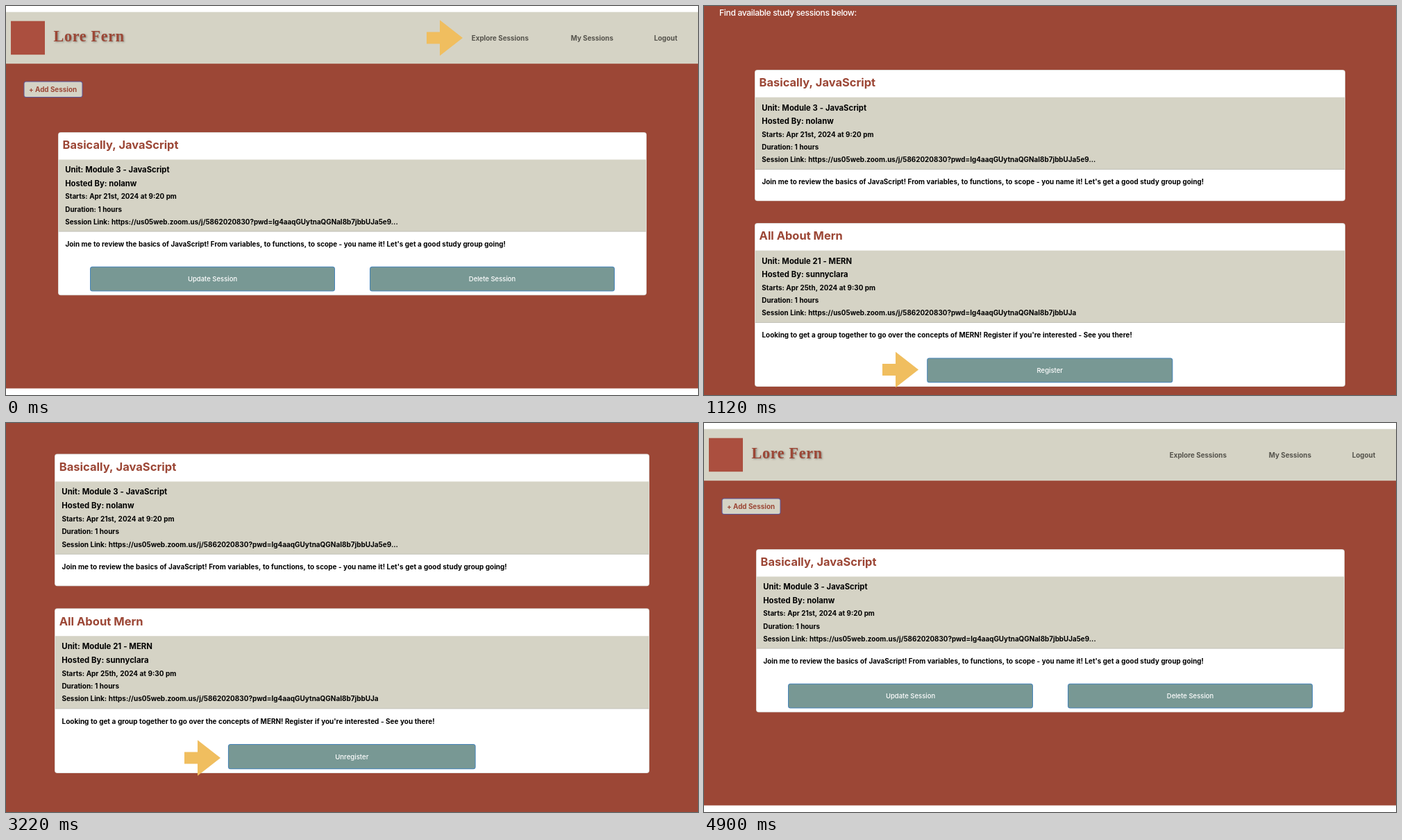
An HTML page with a canvas that plays this animation: 997 by 561 pixels, repeating every 5320 ms.

```html
<!DOCTYPE html>
<html lang="en">
<head>
<meta charset="utf-8">
<title>Study sessions</title>
<style>
html, body { margin: 0; width: 100%; height: 100%; overflow: hidden; background: #9c4736; }
canvas { display: block; width: 997px; height: 561px; }
</style>
</head>
<body>
<canvas id="stage"></canvas>
<script>
const W = 997, H = 561, LOOP = 5320;
const RED = '#9c4736', SAND = '#d5d3c5', TEAL = '#789894', GOLD = '#f0be5f';
const SANS = 'Inter, "Liberation Sans", sans-serif';
const SERIF = '"Liberation Serif", "Noto Serif", serif';
const STYLE = {
  title: { font: `700 16.4px ${SANS}`, color: RED },
  lead: { font: `700 11.25px ${SANS}`, color: '#000', space: '0.2px' },
  line: { font: `700 9.85px ${SANS}`, color: '#000', space: '0.2px' },
  nav: { font: `700 9.85px ${SANS}`, color: '#55534c' },
  add: { font: `700 9.85px ${SANS}`, color: RED },
  button: { font: `500 9.5px ${SANS}`, color: '#fff' },
  intro: { font: `500 12.1px ${SANS}`, color: '#fff', gap: '-0.35px' },
  brand: { font: `700 22.1px ${SERIF}`, color: RED, gap: '0.69px' }
};

const LINK = 'https://us05web.zoom.us/j/5862020830?pwd=Ig4aaqGUytnaQGNaI8b7jbbUJa';
const BASICS = {
  title: 'Basically, JavaScript',
  unit: 'Module 3 - JavaScript',
  host: 'nolanw',
  starts: 'Apr 21st, 2024 at 9:20 pm',
  link: LINK + '5e9...',
  about: "Join me to review the basics of JavaScript! From variables, to functions, to scope - you name it! Let's get a good study group going!"
};
const MERN = {
  title: 'All About Mern',
  unit: 'Module 21 - MERN',
  host: 'sunnyclara',
  starts: 'Apr 25th, 2024 at 9:30 pm',
  link: LINK,
  about: "Looking to get a group together to go over the concepts of MERN! Register if you're interested - See you there!"
};

const canvas = document.getElementById('stage');
const ctx = canvas.getContext('2d');
const ratio = window.devicePixelRatio || 1;
canvas.width = Math.round(W * ratio);
canvas.height = Math.round(H * ratio);

function rect(x, y, w, h, color) {
  ctx.fillStyle = color;
  ctx.fillRect(x, y, w, h);
}

// A rounded panel with a border of the given width inside its edge.
function box(x, y, w, h, r, fill, edge, line = 1) {
  ctx.beginPath();
  ctx.roundRect(x, y, w, h, r);
  ctx.fillStyle = edge;
  ctx.fill();
  ctx.beginPath();
  ctx.roundRect(x + line, y + line, w - 2 * line, h - 2 * line, r - line);
  ctx.fillStyle = fill;
  ctx.fill();
}

function text(str, x, y, style, align = 'left') {
  ctx.font = style.font;
  ctx.letterSpacing = style.gap || '0px';
  ctx.wordSpacing = style.space || '0px';
  ctx.fillStyle = style.color;
  ctx.textAlign = align;
  ctx.fillText(str, x, y);
}

function arrow(x, tipY) {
  ctx.beginPath();
  ctx.moveTo(x, tipY - 8.5);
  ctx.lineTo(x + 19, tipY - 8.5);
  ctx.lineTo(x + 19, tipY - 25.7);
  ctx.lineTo(x + 52, tipY);
  ctx.lineTo(x + 19, tipY + 25.7);
  ctx.lineTo(x + 19, tipY + 8.5);
  ctx.lineTo(x, tipY + 8.5);
  ctx.fillStyle = GOLD;
  ctx.fill();
}

function header(x, y, navX) {
  rect(0, y, W, 74.5, SAND);
  rect(x, y + 13, 49, 48.5, '#ab4f3f');
  ctx.save();
  ctx.shadowColor = 'rgba(0, 0, 0, 0.35)';
  ctx.shadowOffsetX = ctx.shadowOffsetY = 1.4 * ratio;
  ctx.shadowBlur = 2.8 * ratio;
  text('Lore Fern', x + 61.5, y + 42, STYLE.brand);
  ctx.restore();
  ['Explore Sessions', 'My Sessions', 'Logout'].forEach((label, i) =>
    text(label, navX[i], y + 41, STYLE.nav));
}

// Buttons are [label, x] pairs relative to the card.
function card(x, y, scale, info, buttons = []) {
  ctx.save();
  ctx.translate(x, y);
  ctx.scale(scale, scale);
  box(0, 0, 848, buttons.length ? 235.3 : 188.7, 4, '#fff', '#d2cfcb', 0.7);
  rect(0.7, 39.5, 846.6, 103.5, SAND);
  rect(0.7, 142.7, 846.6, 0.8, '#b8b7ae');
  text(info.title, 6.6, 24, STYLE.title);
  text('Unit: ' + info.unit, 10.2, 58.3, STYLE.lead);
  text('Hosted By: ' + info.host, 10.2, 77.9, STYLE.lead);
  text('Starts: ' + info.starts, 10.3, 96.4, STYLE.line);
  text('Duration: 1 hours', 10.3, 114.6, STYLE.line);
  text('Session Link: ' + info.link, 10.3, 132.7, STYLE.line);
  text(info.about, 10.5, 164.6, STYLE.line);
  for (const [label, bx] of buttons) {
    box(bx, 193.7, 353, 35.8, 3.5, TEAL, '#4684ba');
    text(label, bx + 176.5, 215.1, STYLE.button, 'center');
  }
  ctx.restore();
}

function mySessions() {
  rect(0, 0, W, H, '#fff');
  rect(0, 83, W, 468.5, RED);
  header(7, 8.7, [670.7, 813.7, 933.7]);
  box(25.5, 108.5, 85, 23.5, 3.5, SAND, '#5b5799');
  text('+ Add Session', 33, 124, STYLE.add);
  card(75, 182, 1, BASICS, [['Update Session', 46], ['Delete Session', 449]]);
}

function explore(scroll) {
  rect(0, 0, W, H, RED);
  ctx.save();
  ctx.translate(0, -scroll);
  header(4.7, 0, [671, 814, 935]);
  text('Welcome your one stop shop to collaborate with others on topics you are studying! Access the Study-Sessions section to collaborate with others via virtual meetings. To take', 22.3, 126.3, STYLE.intro);
  text('the full advantage of this site, please sign up for an account or login.', 22.3, 145, STYLE.intro);
  text('Find available study sessions below:', 22, 182.6, STYLE.intro);
  card(73, 261, 1.0035, BASICS);
  card(73, 482, 1.0035, MERN, [['Register', 247.3]]);
  ctx.restore();
}

function registered() {
  rect(0, 0, W, H, RED);
  card(70, 44.5, 1.0106, BASICS);
  card(70, 267.3, 1.0106, MERN, [['Unregister', 247.3]]);
}

const SCENES = [
  [1120, () => { mySessions(); arrow(606, 46); }],
  [2170, () => { explore(169); arrow(257, 524.5); }],
  [3220, () => { explore(0); arrow(753, 38); }],
  [4270, () => { registered(); arrow(257, 483); }],
  [LOOP, mySessions]
];

function tick() {
  const t = performance.now() % LOOP;
  ctx.setTransform(ratio, 0, 0, ratio, 0, 0);
  SCENES.find(([end]) => t < end)[1]();
  requestAnimationFrame(tick);
}
tick();
</script>
</body>
</html>
```
